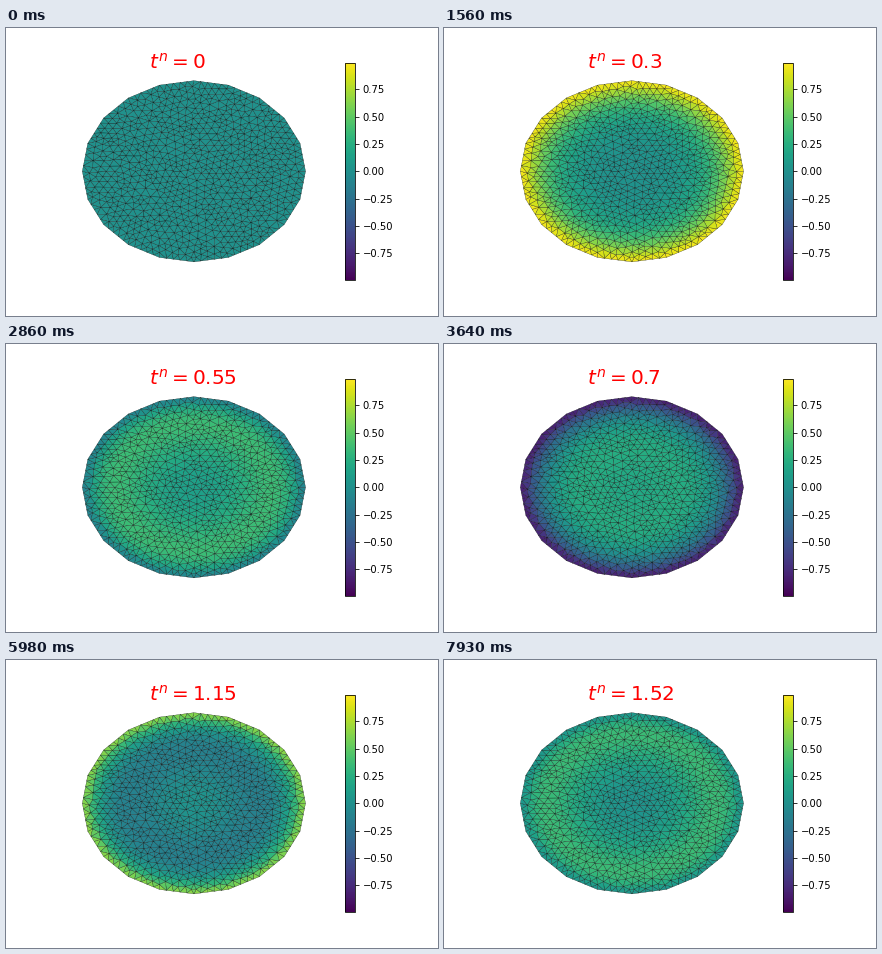
Write a matplotlib script that moves like this. It is 432 px wide and 288 px high and loops after 8000 ms.

```python
import numpy as np
import matplotlib.pyplot as plt
from matplotlib.animation import FuncAnimation
from matplotlib.tri import Triangulation

SIDES, SPLIT = 20, 5
GAP = 0.05            # least distance between scattered mesh points
KAPPA, DT = 0.2, 0.025
STEPS, STEP_MS = 62, 130
LOOP_MS, TICK_MS = 8000, 40


def polygon_boundary():
    ang = np.arange(SIDES + 1) * 2 * np.pi / SIDES
    corners = np.column_stack([np.cos(ang), np.sin(ang)])
    w = np.arange(SPLIT)[:, None] / SPLIT
    return np.vstack([a + (b - a) * w for a, b in zip(corners, corners[1:])])


def scatter_inside(rng, rim, tries=16000):
    """Dart throwing inside the polygon, kept clear of the rim."""
    apothem = np.cos(np.pi / SIDES)
    normal = (np.arange(SIDES) + 0.5) * 2 * np.pi / SIDES
    normals = np.column_stack([np.cos(normal), np.sin(normal)])
    pts, count = np.vstack([rim, np.zeros((tries, 2))]), len(rim)
    for p in rng.uniform(-1, 1, (tries, 2)):
        if (normals @ p).max() > apothem - 0.8 * GAP:
            continue
        if ((pts[:count] - p) ** 2).sum(axis=1).min() > GAP ** 2:
            pts[count] = p
            count += 1
    return pts[:count]


def triangulate(pts):
    tri = Triangulation(pts[:, 0], pts[:, 1]).triangles
    a, b, c = (pts[tri[:, k]] for k in range(3))
    u, v = b - a, c - a
    area = (u[:, 0] * v[:, 1] - u[:, 1] * v[:, 0]) / 2
    return tri[np.abs(area) > 1e-5]


def smooth(pts, fixed, rounds=4):
    for _ in range(rounds):
        tri = triangulate(pts)
        link = np.zeros((len(pts), len(pts)))
        for i, j in ((0, 1), (1, 2), (2, 0)):
            link[tri[:, i], tri[:, j]] = link[tri[:, j], tri[:, i]] = 1
        mean = link @ pts / link.sum(axis=1, keepdims=True)
        pts[fixed:] = mean[fixed:]
    return pts, triangulate(pts)


def assemble(pts, tri):
    """Mass and stiffness matrices for linear elements."""
    n = len(pts)
    mass, stiff = np.zeros((n, n)), np.zeros((n, n))
    for t in tri:
        p = pts[t]
        edge = np.roll(p, -2, axis=0) - np.roll(p, -1, axis=0)
        area = abs(edge[0, 0] * edge[1, 1] - edge[0, 1] * edge[1, 0]) / 2
        cell = np.ix_(t, t)
        mass[cell] += area / 12 * (np.ones((3, 3)) + np.eye(3))
        stiff[cell] += edge @ edge.T / (4 * area)
    return mass, stiff


def solve_heat(pts, tri, fixed):
    """Implicit Euler with an oscillating rim; returns times and cell means."""
    mass, stiff = assemble(pts, tri)
    system = mass + DT * KAPPA * stiff
    inverse = np.linalg.inv(system[fixed:, fixed:])
    u, t = np.zeros(len(pts)), 0.0
    times, cells = [t], [u[tri].mean(axis=1)]
    for _ in range(STEPS - 1):
        rhs = (mass @ u)[fixed:]
        u[:fixed] = np.sin(2 * np.pi * t)   # rim lags the clock by one step
        u[fixed:] = inverse @ (rhs - system[fixed:, :fixed] @ u[:fixed])
        t += DT
        times.append(t)
        cells.append(u[tri].mean(axis=1))
    return times, cells


rim = polygon_boundary()
points, triangles = smooth(scatter_inside(np.random.default_rng(4), rim), len(rim))
times, cells = solve_heat(points, triangles, len(rim))

fig, ax = plt.subplots(figsize=(6, 4), dpi=72)
fig.subplots_adjust(left=0.125, right=0.9, bottom=0.125, top=0.88)
mesh = ax.tripcolor(Triangulation(points[:, 0], points[:, 1], triangles),
                    facecolors=cells[0], edgecolors="k", linewidth=0.25,
                    cmap="viridis", vmin=-0.993, vmax=0.993)
fig.colorbar(mesh, ax=ax)
ax.set(xlim=(-1.2, 1.2), ylim=(-1.2, 1.2))
ax.axis("off")
label = ax.text(-0.4, 1.135, "", color="red", fontsize=20)


def draw(i):
    # look ahead so every step has begun by its own start time
    n = min((i * TICK_MS + 30) // STEP_MS, STEPS - 1)
    mesh.set_array(cells[n])
    label.set_text(f"$t^n={times[n]:.3g}$")
    return mesh, label


anim = FuncAnimation(fig, draw, frames=LOOP_MS // TICK_MS, interval=TICK_MS,
                     init_func=lambda: draw(0), repeat=True, repeat_delay=0)
plt.show()
```
